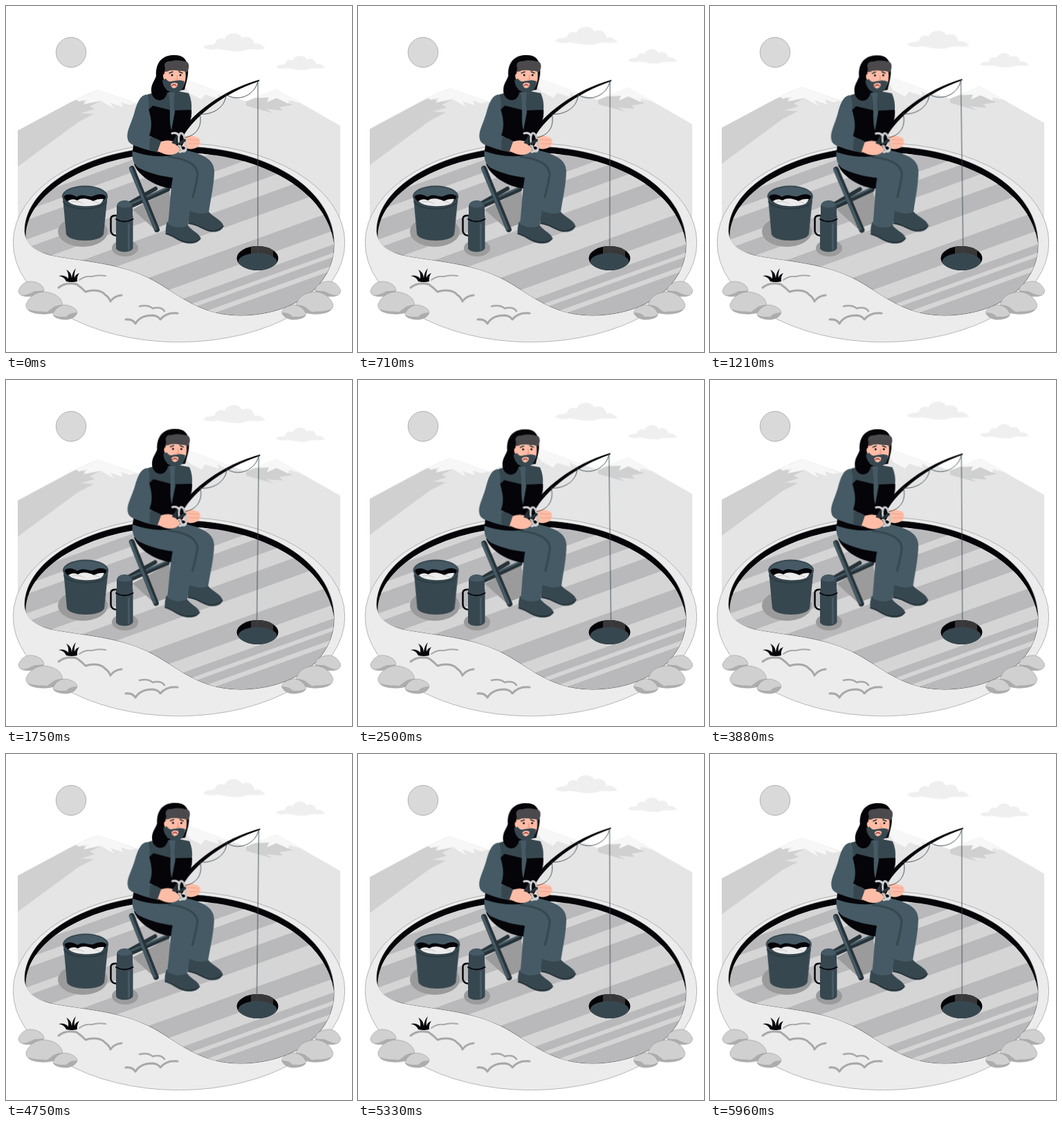
An HTML page that plays this animation: 500x500 px, repeating every 6000 ms.

```html
<!DOCTYPE html>
<html lang="en">
<head>
<meta charset="utf-8">
<title>Ice fishing</title>
<style>
  html, body { margin: 0; width: 100%; height: 100%; overflow: hidden; background: #fff; }
  svg { display: block; width: 100%; height: 100%; }
  .slate { fill: #455a64; }
  .dark { fill: #37474f; }
  .black { fill: #050408; }
  .skin { fill: #ffbda7; }
  .shadow { fill: #9b9b9c; }
  .line { fill: none; stroke-linecap: round; stroke-linejoin: round; }
  .clouds { fill: #efefef; animation: float 1.5s linear infinite; }
  .mountains { animation: float 6s linear infinite; }
  .angler { transform-origin: 271px 219px; animation: sway 1.5s linear infinite; }
  .bucket { animation: shake 1.5s linear infinite; }
  @keyframes float {
    50% { transform: translateY(-10px); }
  }
  @keyframes sway {
    0%, 100% { transform: rotate(0deg); }
    25% { transform: rotate(1deg); }
    75% { transform: rotate(-1deg); }
  }
  @keyframes shake {
    0%, 100% { transform: translateX(0); }
    10%, 90% { transform: translateX(-1px); }
    20%, 80% { transform: translateX(2px); }
    30%, 50%, 70% { transform: translateX(-4px); }
    40%, 60% { transform: translateX(4px); }
  }
</style>
</head>
<body>
<svg viewBox="0 0 500 500">
  <defs>
    <path id="cloud" d="M285 60C289 54 298 57 302 54C303 47 311 45 316 48C319 37 338 37 341 46C352 42 358 48 359 55C366 53 370 57 375 61C365 65 352 60 342 65C327 67 316 63 306 62C298 64 290 63 285 60Z"/>
    <path id="basin" d="M27 326C27 258 127 203 250 203S474 262 474 344C474 407 412 447 338 447C272 447 241 407 198 389C155 370 103 368 65 360C40 354 28 340 27 326Z"/>
    <clipPath id="floorClip"><path d="M28.500 332C31 265 130 212 250 212C373 212 465 270 474 344C474 407 412 447 338 447C272 447 241 407 198 389C155 370 103 368 65 360C40 354 30 344 28.500 332Z"/></clipPath>
    <clipPath id="holeClip"><ellipse cx="363.5" cy="364.500" rx="30" ry="17.5"/></clipPath>
    <g id="rocks" stroke="#777" stroke-width=".4">
      <path fill="#d0d0d0" d="M18 411C21 403 28 397 37 398C46 399 54 403 55 411C49 419 31 422 22 418Q18 416 18 411Z"/>
      <path fill="#adadad" stroke="none" d="M55 411C49 419 31 422 22 418C34 418 38 412 43 412Q49 412 55 411Z"/>
      <path fill="#d0d0d0" d="M29 431C33 421 42 413 55 413C69 414 80 420 82 432C80 441 66 446 50 445C37 444 28 440 29 431Z"/>
      <path fill="#adadad" stroke="none" d="M82 432C80 441 66 446 50 445C40 444 34 442 31 438C42 442 52 441 59 442C67 438 68 432 82 432Z"/>
      <path fill="#d0d0d0" d="M68 444C72 436 78 432 86 432C94 433 102 437 103 443C101 450 92 454 83 453C74 452 68 449 68 444Z"/>
      <path fill="#adadad" stroke="none" d="M103 443C101 450 92 454 83 453C74 452 69 450 68 446C75 450 82 449 87 449Q93 442 103 443Z"/>
    </g>
  </defs>

  <circle cx="94" cy="67" r="21.7" fill="#d9d9d9" stroke="#777" stroke-width=".5"/>

  <g class="clouds">
    <use href="#cloud"/>
    <use href="#cloud" transform="translate(164.9 40.8) scale(.79)"/>
  </g>

  <g class="mountains">
    <path fill="#e5e5e5" d="M17 180L95 138Q116 127 133 121L190 141L258 109Q264 107 270 110L347 138L390 120L483 173V320H17Z"/>
    <path fill="#d0d0d0" d="M17 180L92 140L116 129L112 139L137 137L121 145L128 149L108 155L127 156L104 168L17 232Z"/>
    <path fill="#f7f7f7" d="M101 135L133 121L188 141L178 143L166 139L169 146L151 140L156 148L137 137L112 142L118 135L105 138Z"/>
    <path fill="#f7f7f7" d="M255 110Q264 106 270 110L330 132L316 133L306 127L307 134L288 128L282 135L265 126Z"/>
    <path fill="#d0d0d0" d="M347 138L370 129L391 133L414 143L395 146L400 151L376 149L386 155L347 144Z"/>
    <path fill="#f7f7f7" d="M360 133L390 120L424 140L409 136L408 141L391 133L377 139L380 132Z"/>
  </g>

  <ellipse cx="250" cy="342" rx="239.7" ry="143.7" fill="#ececec" stroke="#777" stroke-width=".5"/>
  <use href="#basin" class="black" stroke="#333" stroke-width=".7"/>
  <g clip-path="url(#floorClip)">
    <rect x="20" y="200" width="460" height="260" fill="#b9b9bb"/>
    <g id="stripes" fill="#d5d5d6"></g>
  </g>

  <g clip-path="url(#holeClip)">
    <rect class="black" x="330" y="345" width="66" height="40"/>
    <path fill="#3a3739" d="M354 345H386V362H354Z"/>
    <ellipse class="dark" cx="363.5" cy="369.500" rx="28" ry="12.500"/>
  </g>

  <use href="#rocks"/>
  <use href="#rocks" transform="translate(501.5) scale(-1 1)"/>

  <g class="line" stroke="#a8a8a8" stroke-width="3">
    <path d="M76 407C84 400 93 400 102 402Q108 406 115 413C126 409 138 411 143 417Q149 421 151 427Q156 419 167 418"/>
    <path stroke-width="2" d="M106 396Q114 390 124 391Q133 388 144 390"/>
    <path d="M173 453Q183 452 187 459Q194 447 212 447Q220 448 223 453Q232 442 248 444"/>
    <path stroke-width="2.500" d="M193 434Q205 431 212 437Q224 434 229 441"/>
  </g>
  <path class="black" d="M87 398Q84 391 76 390Q85 388 90 394Q91 386 87 381Q94 384 95 393Q96 384 101 379Q98 386 99 393Q100 388 106 386Q102 391 103 398Q95 400 87 398Z"/>

  <ellipse class="shadow" cx="111" cy="326" rx="36" ry="22"/>
  <ellipse class="shadow" cx="172" cy="350" rx="19" ry="12"/>
  <path class="shadow" d="M183 294L236 266L241 312L214 322Z"/>

  <g class="bucket">
    <path class="dark" d="M82 276L87 330C92 342 136 342 141 330L146.500 276Z"/>
    <path fill="#2b3a41" d="M82 281C92 296 137 296 146 281L145.500 284C136 297 92 297 82.500 284Z"/>
    <ellipse class="dark" cx="114" cy="275" rx="33" ry="15.500"/>
    <ellipse fill="#455a64" cx="114" cy="275" rx="31" ry="13.500"/>
    <path class="black" d="M83.500 275C89 270 98 273 102 276C112 270 119 277 125 275C133 271 140 271 144.500 275C143 284 130 288 114 288S85 284 83.500 275Z"/>
    <path fill="#ececec" d="M89 282Q96 277 103 281C110 276 120 279 126 282Q133 278 141 279Q139 284 136 286Q125 290 110 289Q95 288 89 282Z"/>
    <path class="line" stroke="#c8c8c8" d="M95 283Q106 281 112 286M127 282L134 285"/>
  </g>

  <g class="angler">
    <g class="line">
      <path stroke="#263238" stroke-width="6" d="M179 285L216 264M181 289L234 265"/>
      <path stroke="#455a64" stroke-width="3" d="M180 286L232 263"/>
      <path stroke="#263238" stroke-width="8" d="M182 235L218 323"/>
      <path stroke="#455a64" stroke-width="4" d="M180 235L216 322"/>
    </g>
    <path class="black" d="M185 228C191 245 214 261 240 264L243 248L207 225Z"/>

    <path class="dark" d="M265 293L292 296C297 304 312 309 314 317C314 325 303 328 294 326C283 323 278 317 264 315Q263 303 265 293Z"/>
    <path class="dark" d="M233 312L262 316C267 324 279 328 281 335C280 343 267 345 257 342C247 339 242 333 231 330Q230 320 233 312Z"/>
    <path class="line" stroke="#263238" stroke-width="1.500" d="M231 329C243 331 249 340 262 341Q275 342 281 336M264 314C279 315 286 325 298 325Q309 324 314 318"/>
    <path class="slate" d="M183 207C181 222 185 232 196 236C211 243 226 246 241 248C237 270 237 294 234 315Q249 324 263 317L270 266L264 295Q280 303 293 298C296 278 301 257 301 238C300 222 287 217 274 212L239 203Z"/>
    <path class="line" stroke="#37474f" stroke-width="3" d="M235 218C256 220 277 227 277 244Q274 262 270 276"/>

    <path class="slate" d="M202 128C193 130 189 141 185 156C180 172 173 183 176 193C178 202 197 207 219 211L230 197L224 133Z"/>
    <path class="black" d="M206 149L212 143L240 150L268 149Q269 160 265 169L249 190L239 216C220 219 201 216 183 210L184 201C192 204 205 209 219 211L224 196L207 187C212 174 210 163 206 149Z"/>
    <path class="dark" d="M204 128L232 120L264 126Q269 137 268 150L240 151L212 144L206 150Q208 138 204 128Z"/>
    <path class="slate" d="M234 123L244 123Q241 143 244 153L239 180C234 162 240 143 234 123Z"/>
    <path class="dark" d="M208 190Q217 190 225 196L220 212L207 207Z"/>

    <path class="black" d="M217 101C216 86 222 72 241 71C256 70 262 77 263 90C264 102 260 111 258 121L233 125C230 141 212 139 210 124C209 113 215 108 217 101Z"/>
    <path class="skin" d="M229 95Q243 86 259 92C261 105 259 116 250 123Q241 126 232 121Z"/>
    <path class="skin" d="M231 98Q227 96 227 102Q228 108 232 109Z"/>
    <path class="dark" d="M226 107L231 105C236 112 239 108 245 108Q252 106 258 109C257 122 250 126 240 125Q227 121 226 107Z"/>
    <path class="skin" d="M238 113Q242 109 248 112Q249 117 243 119Q238 118 238 113Z"/>
    <path class="line" stroke="#a74b44" stroke-width="1.700" d="M240 115Q243 112 246 115"/>
    <g class="black"><circle cx="240" cy="100" r="1.400"/><circle cx="252" cy="100" r="1.400"/></g>
    <path class="line" stroke="#263238" stroke-width="1.400" d="M236 97L241 95M250 95L255 97"/>
    <path class="line" stroke="#e58c79" d="M247 100L248 106L245 106"/>
    <path fill="#4b494b" d="M230 90C227 83 232 79 238 80C246 77 255 79 262 81C266 85 264 93 261 96Q256 93 251 94Q240 91 232 95Q228 95 230 90Z"/>

    <path class="skin" d="M258 190C264 185 272 188 279 191Q283 197 278 203C271 208 262 208 257 203Z"/>
    <path class="line" stroke="#e99a87" stroke-width=".8" d="M263 193L278 194M264 199L279 199"/>
    <path class="skin" d="M224 196Q236 192 244 197L252 207C249 214 238 217 229 214L219 210Z"/>
    <path class="black" d="M239 205L250 187C266 158 311 122 366 106.500V108.500C315 126 272 159 255 190L245 207Z"/>
    <path class="line" stroke="#263238" stroke-width="7" d="M243 199L250 188"/>
    <ellipse class="black" cx="252" cy="194" rx="5" ry="9"/>
    <ellipse cx="255" cy="197" rx="5" ry="13.500" fill="none" stroke="#c4c8ca" stroke-width="3" transform="rotate(-10 255 197)"/>
    <path class="line" stroke="#d3d3d3" stroke-width="3" d="M240 184Q246 182 250 187M251 211L260 208"/>
    <path class="line" stroke="#263238" stroke-width="4" d="M251 199L258 194"/>
    <path class="skin" d="M239 198Q248 200 250 206L246 213L234 208Z"/>
    <g class="line" stroke="#37474f" stroke-width=".9">
      <path d="M259 190C276 187 284 173 280 156C296 158 317 148 318 128C336 140 361 128 364 108"/>
      <path d="M364 108V367"/>
    </g>
  </g>

  <path class="line" stroke="#050408" stroke-width="2.500" d="M161 303Q152 302 151.500 307V325Q152 331 160 332"/>
  <path class="dark" d="M159 303H183.500V350C181 357 161 357 159 350Z"/>
  <path class="dark" d="M160 308V290C160 278 183 278 183 290V308Q172 313 160 308Z"/>
  <path class="slate" d="M161 289C162 279 181 279 182 289Q172 294 161 289Z"/>
  <path class="slate" d="M176 314H179V352L176 353Z"/>
  <path class="line" stroke="#050408" stroke-width="2" d="M159 308Q171 315 183.500 308"/>
</svg>
<script>
  // Each band: height of its upper edge at x = 250, and its thickness.
  const bands = [[183, 15], [216, 14], [258, 12], [294, 23], [344, 33], [405, 20], [437, 6], [455, 7]];
  const rise = 0.36;
  const edge = (x, y) => `${x} ${y - (x - 250) * rise}`;
  const d = bands.map(([y, h]) =>
    `M${edge(0, y)}L${edge(500, y)}L${edge(500, y + h)}L${edge(0, y + h)}Z`).join("");
  const path = document.createElementNS("http://www.w3.org/2000/svg", "path");
  path.setAttribute("d", d);
  document.getElementById("stripes").append(path);
</script>
</body>
</html>
```
